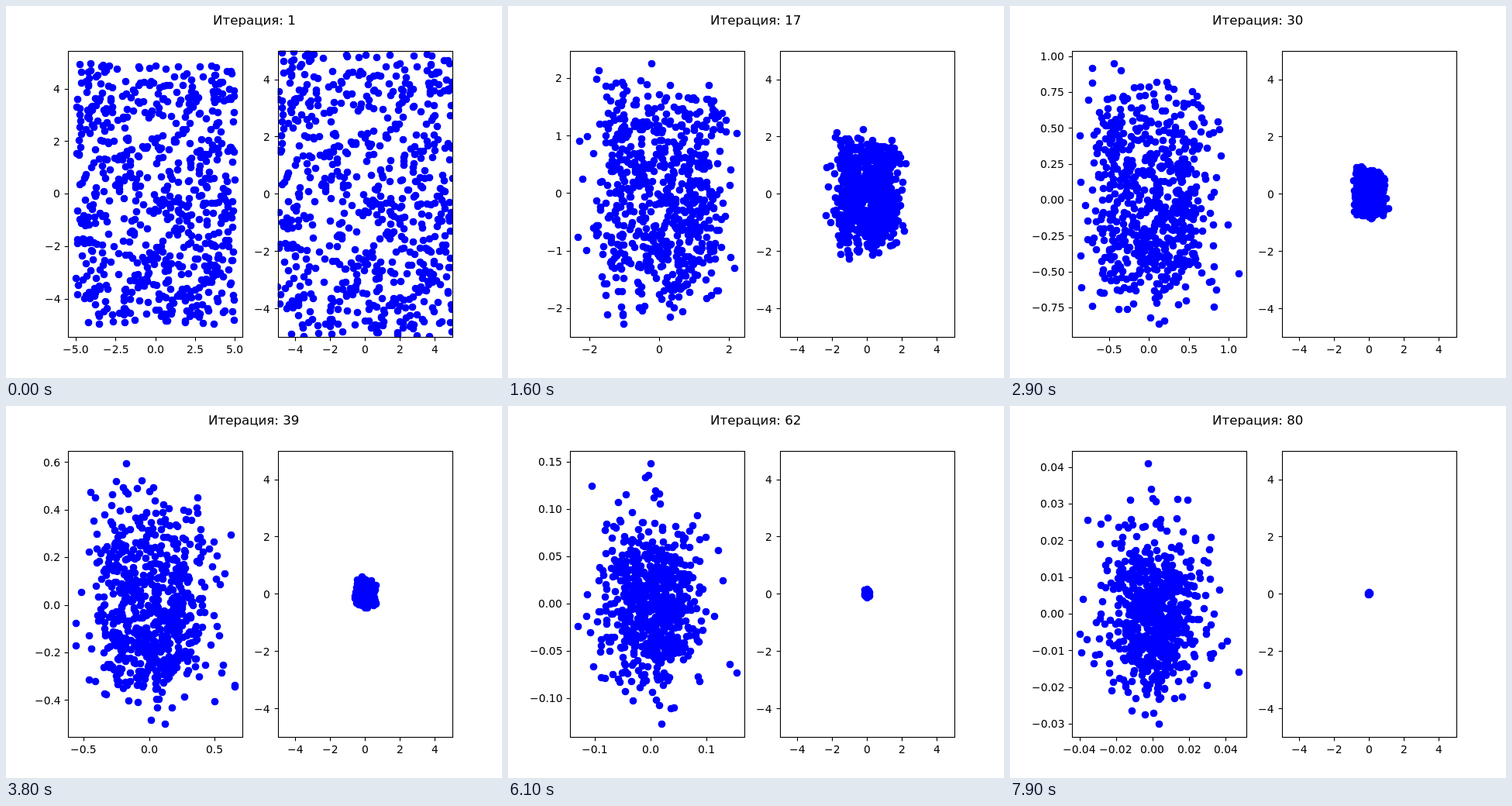
Recreate the animation shown at these times as an HTML page with a canvas. Size 640x480 px, loop 8 s.

```html
<!DOCTYPE html>
<html lang="ru">
<head>
<meta charset="utf-8">
<title>Итерации</title>
<style>
  html, body { margin: 0; width: 100%; height: 100%; overflow: hidden; background: #fff; }
  canvas { display: block; }
</style>
</head>
<body>
<canvas id="stage" width="640" height="480"></canvas>
<script>
const ctx = document.getElementById('stage').getContext('2d');
const STEPS = 80, STEP_MS = 100, COUNT = 660, SHRINK = .137;
const BOX = { y: 57.6, w: 225.45, h: 369.6 };
const LEFT = 80, RIGHT = 350.55;
const FONT = '"DejaVu Sans", Verdana, sans-serif';

// Key extents of the cloud: step, then x min, x max, y min, y max.
const KEYS = [
  [0, -5, 5, -4.97, 4.95],
  [8, -3.71, 3.44, -3.34, 3.63],
  [16, -2.33, 2.217, -2.275, 2.25],
  [29, -.864, 1.128, -.865, .947],
  [48, -.3446, .3548, -.2728, .3523],
  [61, -.1303, .1548, -.1274, .148],
  [79, -.0397, .04715, -.0301, .0409]
];

let seed = 20177;
function random() {
  seed = (seed + 0x6D2B79F5) | 0;
  let t = Math.imul(seed ^ seed >>> 15, 1 | seed);
  t = t + Math.imul(t ^ t >>> 7, 61 | t) ^ t;
  return ((t ^ t >>> 14) >>> 0) / 4294967296;
}

// Every coordinate shrinks towards zero by its own random factor at each step.
const axisValues = () => Array.from({ length: COUNT }, () => 10 * (random() - .5));
const clouds = [[axisValues(), axisValues()]];
for (let n = 1; n < STEPS; n++)
  clouds.push(clouds[n - 1].map(axis => axis.map(v => v * (1 - SHRINK * random()))));

// Extents decay exponentially from key to key.
function extents(n) {
  const k = Math.max(1, KEYS.findIndex(key => key[0] >= n));
  const [a, ...from] = KEYS[k - 1], [b, ...to] = KEYS[k];
  return from.map((v, i) => v * (to[i] / v) ** ((n - a) / (b - a)));
}

// Moves the outermost values onto lo and hi, hardly touching the middle.
function stretch(values, lo, hi) {
  const min = Math.min(...values), max = Math.max(...values);
  return values.map(v => {
    const [edge, goal] = v < 0 ? [min, lo] : [max, hi];
    return v * (1 + (goal / edge - 1) * (v / edge) ** 2);
  });
}

function pad(lo, hi) {
  const margin = (hi - lo) * .05;
  return [lo - margin, hi + margin];
}

const snap = v => Math.floor(v + .5) + .5;

function ticks([lo, hi], bins) {
  const raw = (hi - lo) / bins;
  const power = Math.floor(Math.log10(raw));
  const base = [1, 2, 2.5, 5, 10].find(s => s * 10 ** power >= raw);
  const step = base * 10 ** power;
  const digits = Math.max(0, (base === 2.5 ? 1 : base === 10 ? -1 : 0) - power);
  const list = [];
  for (let i = Math.ceil(lo / step); i * step <= hi; i++)
    list.push([i * step, (i * step).toFixed(digits).replace('-', '\u2212')]);
  return list;
}

function line(x1, y1, x2, y2) {
  ctx.beginPath();
  ctx.moveTo(x1, y1);
  ctx.lineTo(x2, y2);
  ctx.stroke();
}

// anchor: 0.5 centres the text on x, 1 ends it there.
function text(str, x, y, anchor, size) {
  ctx.font = size + 'px ' + FONT;
  ctx.fontKerning = 'none';
  ctx.fillText(str, Math.round(x - ctx.measureText(str).width * anchor), Math.round(y));
}

function panel(x0, xlim, ylim, xs, ys) {
  const { y: y0, w, h } = BOX;
  const px = v => x0 + (v - xlim[0]) / (xlim[1] - xlim[0]) * w;
  const py = v => y0 + (ylim[1] - v) / (ylim[1] - ylim[0]) * h;

  ctx.save();
  ctx.beginPath();
  ctx.rect(x0, y0, w, h);
  ctx.clip();
  ctx.fillStyle = '#00f';
  ctx.beginPath();
  xs.forEach((x, i) => {
    const cx = Math.floor(px(x)) + .5, cy = Math.floor(py(ys[i])) + .5;
    ctx.moveTo(cx + 4.86, cy);
    ctx.arc(cx, cy, 4.86, 0, 2 * Math.PI);
  });
  ctx.fill();
  ctx.restore();

  ctx.fillStyle = ctx.strokeStyle = '#000';
  ctx.lineWidth = 1.11;
  const l = snap(x0), r = snap(x0 + w), t = snap(y0), b = snap(y0 + h);
  ctx.strokeRect(l, t, r - l, b - t);
  for (const [v, label] of ticks(xlim, 5)) {
    line(snap(px(v)), b, snap(px(v)), b + 4.86);
    text(label, px(v), 448, .5, 13.89);
  }
  for (const [v, label] of ticks(ylim, 9)) {
    line(l - 4.86, snap(py(v)), l, snap(py(v)));
    text(label, x0 - 9.72, py(v) + 5.4, 1, 13.89);
  }
}

function draw(n) {
  const [x1, x2, y1, y2] = extents(n);
  const xs = stretch(clouds[n][0], x1, x2), ys = stretch(clouds[n][1], y1, y2);

  ctx.fillStyle = '#fff';
  ctx.fillRect(0, 0, 640, 480);
  panel(LEFT, pad(x1, x2), pad(y1, y2), xs, ys);
  panel(RIGHT, [-5, 5], [-5, 5], xs, ys);
  text('Итерация: ' + (n + 1), 320, 24, .5, 16.67);
}

let shown = -1;
const start = performance.now();
function tick() {
  const n = Math.floor((performance.now() - start) / STEP_MS) % STEPS;
  if (n !== shown) draw(shown = n);
  requestAnimationFrame(tick);
}
tick();
</script>
</body>
</html>
```
